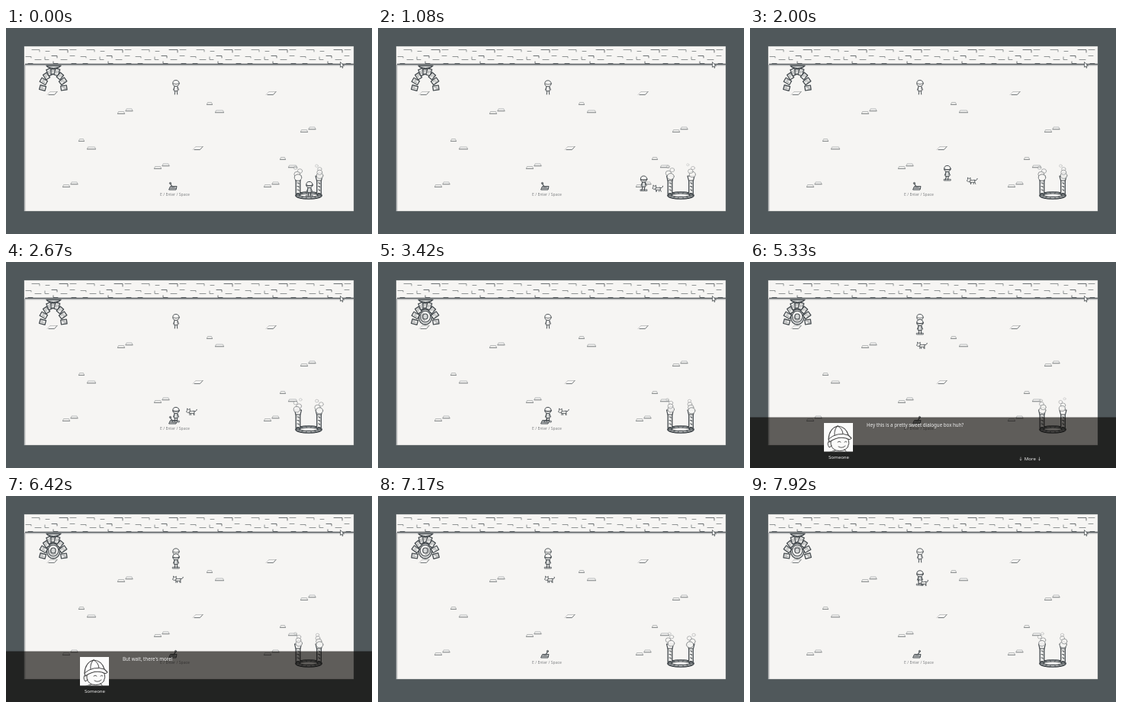
An HTML page with a canvas for the animation above (8000 ms loop, 480 by 270 pixels).

```html
<!DOCTYPE html>
<html>
<head>
<meta charset="utf-8">
<style>
html, body { margin: 0; width: 100%; height: 100%; overflow: hidden; background: #50585b; }
canvas { display: block; }
</style>
</head>
<body>
<canvas id="stage" width="480" height="270"></canvas>
<script>
const ctx = document.getElementById('stage').getContext('2d');
const LOOP = 8000, STEP = 1000 / 12;
const PAPER = '#f6f5f3', INK = '#454b4f', PENCIL = '#777b7d';
const FONT = '"Noto Sans", "Open Sans", sans-serif';

// [time, x, y] of the feet
const HERO = [[0, 398, 221], [580, 398, 221], [2000, 259, 200], [2450, 223, 210],
  [3550, 223, 210], [4333, 223, 132], [4720, 223, 95], [7300, 223, 95], [7580, 223, 117]];
const DOG = [[700, 398, 219], [2000, 291, 205], [2500, 243, 201], [3650, 243, 201],
  [4333, 230, 169], [4900, 225, 114], [7300, 225, 114], [7600, 227, 118]];
const DOG_IN = 700, LEVER_AT = 2750;
const PAGES = [
  { from: 4750, to: 5750, text: 'Hey this is a pretty sweet dialogue box huh?', more: true },
  { from: 5750, to: 6800, text: "But wait, there's more!" }
];

function along(keys, t) {
  let i = 0;
  while (i < keys.length - 1 && keys[i + 1][0] <= t) i++;
  const a = keys[i], b = keys[i + 1];
  if (!b) return { x: a[1], y: a[2], moving: false };
  const p = Math.max(0, (t - a[0]) / (b[0] - a[0]));
  const dx = b[1] - a[1], dy = b[2] - a[2];
  return { x: a[1] + dx * p, y: a[2] + dy * p, moving: p > 0 && (dx !== 0 || dy !== 0) };
}

function paint(stroke, width, fill) {
  if (fill) { ctx.fillStyle = fill; ctx.fill(); }
  if (stroke) { ctx.strokeStyle = stroke; ctx.lineWidth = width; ctx.stroke(); }
}

function path(d, stroke, width = 1, fill) {
  const p = new Path2D(d);
  if (fill) { ctx.fillStyle = fill; ctx.fill(p); }
  if (stroke) { ctx.strokeStyle = stroke; ctx.lineWidth = width; ctx.stroke(p); }
}

function oval(x, y, rx, ry, stroke, width = 1, fill) {
  ctx.beginPath();
  ctx.ellipse(x, y, rx, ry, 0, 0, 7);
  paint(stroke, width, fill);
}

function box(x, y, w, h, stroke, width = 1, fill) {
  ctx.beginPath();
  ctx.rect(x, y, w, h);
  paint(stroke, width, fill);
}

function at(x, y, draw) {
  ctx.save();
  ctx.translate(x, y);
  draw();
  ctx.restore();
}

function label(text, x, y, size, color, align = 'left') {
  ctx.font = `${size}px ${FONT}`;
  ctx.textAlign = align;
  ctx.fillStyle = color;
  ctx.fillText(text, x, y);
}

function slab(x, y) {
  at(x, y, () => {
    path('M-3 -2.5H6 M-3 -2.5L-7 1.5', '#b0b2b3', 0.7);
    path('M6 -2.5L2.5 1.5H-5', '#666b6e', 0.9);
  });
}

function pebble(x, y, w) {
  at(x, y, () => {
    path(`M${-w} 1L${1 - w} -1.5H${w - 1}L${w} 1`, '#a0a3a4', 0.7);
    path(`M${-w} 1.3H${w}`, '#6a6f72', 0.9);
  });
}

function room() {
  box(0, 0, 480, 270, null, 0, '#50585b');
  box(24, 24, 432, 216, 'rgba(150,155,157,.35)', 1, PAPER);
  box(24, 48, 1.5, 192, null, 0, '#b9bcbc');
  for (let x = 24; x < 456; x += 72)
    at(x, 24, () => {
      path('M10 4.5H20V7 M28 6.5H33 M60 4.5H68 M2 13.5H9V15 M60 12.5H66 M14 17.5H22 M27 14V17.5H32 M48 17.5H56', PENCIL, 0.8);
      path('M46 4.5H57V8 M36 12.5H43V15 M5 22.5H11 M38 20V22.5H44 M62 22.5H68', '#5c6164', 0.9);
    });
  box(25, 46.8, 431, 1.8, null, 0, '#5b6063');
  box(25, 48.6, 431, 1, null, 0, '#b5b8b9');

  for (const [x, y] of [[61, 86], [348, 86], [252, 158]]) slab(x, y);
  for (const [x, y] of [[151, 111], [391, 135], [199, 183], [79, 207], [343, 207]]) {
    pebble(x, y, 4.5);
    pebble(x + 10.5, y - 3.5, 4.5);
  }
  for (const [x, y] of [[267, 99], [99, 147], [363, 171]]) {
    pebble(x, y, 3.5);
    pebble(x + 13, y + 10.5, 5.5);
  }
}

function arch(k, open) {
  const wob = (k >> 1) % 2 ? 0.06 : -0.06;
  if (open) {
    oval(62, 72, 8.8, 10, INK, 1.3, '#d6d8d8');
    oval(62, 71.5, 6.8, 7.2, INK, 1.1, PAPER);
    oval(62, 71.5, 3.2, 3.5, INK, 1.2, '#d6d8d8');
    const a = k * 0.5;
    ctx.beginPath();
    ctx.arc(62, 71.5, 5, a, a + 2.5);
    paint(PENCIL, 0.9);
  }
  // Stones lean inward towards the narrow crown
  for (let i = 0; i <= 8; i++) {
    const a = Math.PI * (1 + i / 8), c = Math.cos(a), s = Math.sin(a);
    at(62 + 14 * c * (1 + 0.13 * s), 78.5 + 22 * s, () => {
      ctx.rotate(a + (i % 2 ? wob : -wob) - 0.2 * c);
      box(-3.9, -2.9, 7.6 + i % 2, 5.8, INK, 1.3, '#f0f0ee');
      path('M-1.5 -0.8H2 M0 1.2H2.5', PENCIL, 0.7);
    });
  }
  path('M53 49.5Q62 58 72 49.5Z', INK, 1.3, '#e6e7e6');
  path('M56 51.5Q62 54 69 51.5', INK, 1);
}

function gateBase() {
  oval(397, 219.5, 17, 4.5, INK, 1.7, '#d6d8d8');
  oval(397, 219.2, 12, 2.2, INK, 1.1, PAPER);
  for (let i = 0; i < 14; i++) {
    const a = i * Math.PI / 7, c = Math.cos(a), s = Math.sin(a);
    path(`M${397 + 12 * c} ${219.3 + 2.4 * s}L${397 + 17 * c} ${219.5 + 4.5 * s}`, INK, 0.9);
  }
}

function pillar(x, k, lag) {
  box(x - 2.8, 197, 5.6, 20.5, INK, 1.3, '#eeeeec');
  for (let y = 203; y < 217; y += 4.5) path(`M${x - 1} ${y}H${x + 1}V${y + 1.5}`, INK, 0.9);
  path(`M${x - 4.5} 194H${x + 4.5}L${x + 3} 200H${x - 3}Z`, INK, 1.1, PAPER);
  for (let i = 3; i >= 0; i--) {
    const p = (k / 12 + i / 4 + lag) % 1;
    ctx.globalAlpha = 1 - p * 0.75;
    oval(x + Math.sin(p * 7 + i * 2) * 3 * (0.4 + p), 196 - 17 * p, 4.8 - 3.2 * p, 4.2 - 2.8 * p, PENCIL, 0.9, PAPER);
  }
  ctx.globalAlpha = 1;
}

function lever(pulled) {
  at(219, 210, () => {
    const x = pulled ? 3.5 : -3.5;
    path(`M${x / 4} -2L${x} -6`, INK, 1.1);
    oval(x, -6.5, 1.1, 1.1, INK, 0.9, '#8b8e90');
    path('M-3 -2.5H5L4 2H-5Z', INK, 1, '#d6d8d8');
    path('M-4 0H4 M-2 -1H2', INK, 0.8);
  });
  label('E / Enter / Space', 202, 219.8, 5.1, '#808385');
}

function person(x, y, k, hero, moving) {
  const swing = moving ? (k % 4 < 2 ? 1 : -1) : 0;
  const bob = moving ? 0 : (k >> 2) % 2 * 0.4;
  const ink = hero ? INK : '#575c5f';
  at(x, y, () => {
    if (hero) box(-4.3, -1.8, 8.6, 1.8, ink, 0.7, '#d2d4d4');
    path(`M-1.2 -6L${-1.7 - swing} -1 M1.2 -6L${1.7 - swing} -1`, ink, 1.1);
    path('M-1.8 -11.5H1.8L2.3 -5.5H-2.3Z', ink, 0.9, hero ? '#d9dbdb' : PAPER);
    path('M-2 -11L-3.6 -7 M2 -11L3.6 -7', ink, 0.9);
    oval(0, -15.6 + bob, 4.2, 4, ink, 1, PAPER);
    path(`M-4.2 ${-15.2 + bob}Q0 ${-13.4 + bob} 4.2 ${-15.2 + bob}`, ink, hero ? 1.3 : 0.8);
  });
}

function dog(x, y, k, moving) {
  const swing = moving && k % 4 < 2 ? 1 : 0;
  at(x, y, () => {
    ctx.scale(0.9, 0.9);
    path(`M-2 -4L${-2.5 + swing} -0.5 M-0.5 -4L${-0.5 - swing} -0.5 M3 -4L${3.5 - swing} -0.5 M4 -4L${4.5 + swing} -0.5`, INK, 0.9);
    path('M-3 -6.5Q1 -5.5 4 -6.5L4.5 -3H-2.5Z', INK, 0.9, PAPER);
    path(`M4 -6Q7.5 -5 ${k % 4 < 2 ? 8 : 7} -8.5`, INK, 1.1);
    path('M-7 -5.5L-6 -7.5V-10L-4 -8.2L-2 -9.8L-2 -5L-4.5 -4Z', INK, 0.9, PAPER);
  });
}

function portrait() {
  box(97, 211, 38, 37.5, null, 0, '#fbfbfa');
  ctx.save();
  ctx.beginPath();
  ctx.rect(97, 211, 38, 37.5);
  ctx.clip();
  at(97, 211, () => {
    path('M9 24Q8 33 16 36Q26 38 31 32Q34 27 32 21', '#444', 1);
    path('M7 23Q3 27 7 32L10 30 M15 36L8 38 M27 35L30 38', '#444', 1);
    path('M6 21Q7 7 18 4Q29 5 32 16L36 20Q34 23 29 20Q18 17 7 25Z', '#444', 1.1, '#fff');
    path('M6 21Q18 11 32 16 M18 4Q13 8 14 16 M18 4Q24 7 25 14', '#444', 1);
    path('M18 25Q20 23 22 25 M27 25Q29 23 30 25 M19 31Q24 34 28 30', '#444', 0.9);
  });
  ctx.restore();
}

function dialogue(t) {
  const page = PAGES.find(p => t >= p.from && t < p.to);
  if (!page) return;
  box(0, 203.4, 480, 66.6, null, 0, 'rgba(8,5,2,.63)');
  portrait();
  label('Someone', 116.5, 258, 6.1, '#eee', 'center');
  const shown = Math.floor((t - page.from) / 12);
  label(page.text.slice(0, shown), 153, 215.6, 6.2, '#eee');
  if (page.more && shown >= page.text.length) {
    label('More', 367.3, 260, 6.1, '#eee', 'center');
    for (const x of [355, 379.5])
      path(`M${x} 256V260 M${x - 1} 258.8L${x} 260L${x + 1} 258.8`, '#ccc', 0.6);
  }
}

function frame(now) {
  const k = Math.floor((now % LOOP + 5) / STEP), t = k * STEP + 1;
  const hero = along(HERO, t), pet = along(DOG, t), pulled = t >= LEVER_AT;
  ctx.lineJoin = ctx.lineCap = 'round';
  room();
  arch(k, pulled);
  gateBase();
  lever(pulled);
  const cast = [
    { y: 88, draw: () => person(223, 88, k, false, false) },
    { y: hero.y, draw: () => person(hero.x, hero.y, k, true, hero.moving) }
  ];
  if (t >= DOG_IN) cast.push({ y: pet.y, draw: () => dog(pet.x, pet.y, k, pet.moving) });
  cast.sort((a, b) => a.y - b.y).forEach(c => c.draw());
  pillar(383, k, 0);
  pillar(410.5, k, 0.4);
  dialogue(t);
  path('M438.5 45V51.5L440 50L441.2 52.5L442 52L441 49.7H443Z', '#3a3f42', 0.7, '#fff');
  requestAnimationFrame(frame);
}
requestAnimationFrame(frame);
</script>
</body>
</html>
```
